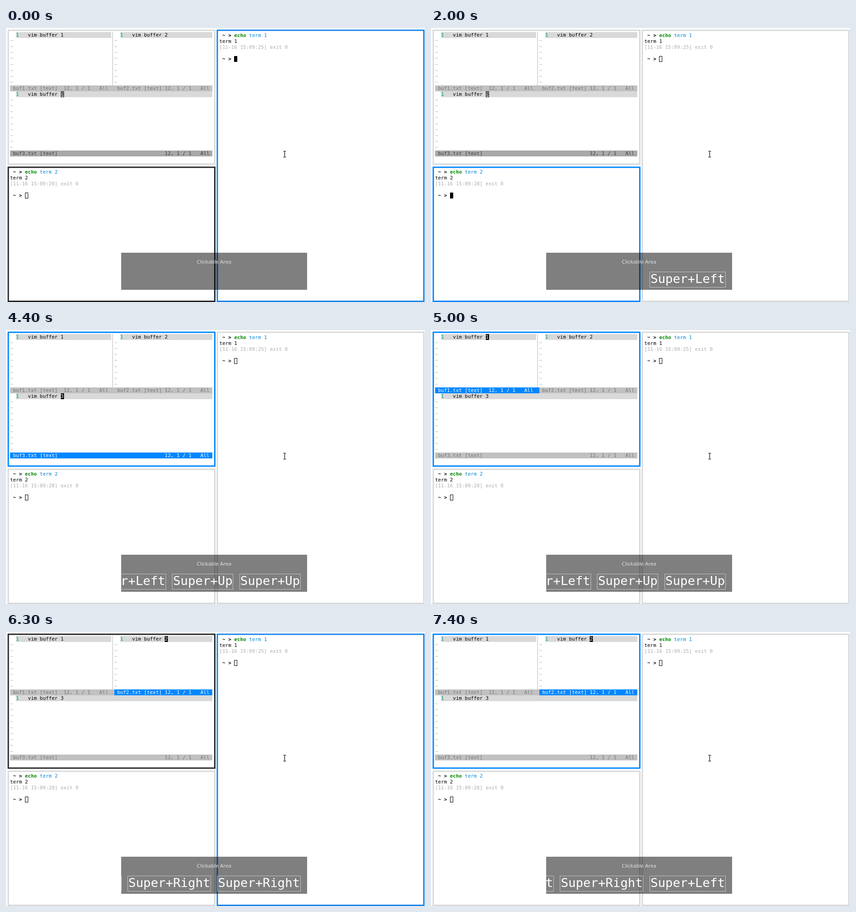
An HTML page with a canvas for the animation above (8 s loop, 924 by 606 pixels).

```html
<!DOCTYPE html>
<html lang="en">
<head>
<meta charset="utf-8">
<title>Window focus</title>
<style>
html, body { margin: 0; width: 100%; height: 100%; overflow: hidden; background: #fff; }
canvas { display: block; }
</style>
</head>
<body>
<canvas id="stage" width="924" height="606"></canvas>
<script>
const ctx = document.getElementById('stage').getContext('2d');
const LOOP = 8000;
const MONO = '"DejaVu Sans Mono", monospace';
const SIZE = 10.9, CELL = 6.56, ROW = 13.1;
const BLUE = '#0087ff', LIGHT = '#d9d9d9', DARK = '#262629', FAINT = '#adadad';

const FRAMES = {
  top: [5, 5, 455.5, 296],
  bottom: [5, 308, 455.5, 296.5],
  right: [466, 5, 455.5, 599.5]
};

// Each list holds [start time, value]; the latest started value applies.
const BORDERS = [[0, 'right'], [1500, 'bottom'], [3100, 'top'], [6300, 'right'], [7300, 'top']];
const CURSORS = [[0, 'right'], [1500, 'bottom'], [3100, 'top'], [6400, 'right'], [7400, 'top']];
const LAST_LEFT = [[0, 'bottom'], [3100, 'top']];
const BUFFERS = [[0, 3], [4500, 1], [5500, 2]];
const KEYS = [[1400, 'Left'], [3000, 'Up'], [4400, 'Up'], [5400, 'Right'], [6200, 'Right'], [7200, 'Left']];

function at(list, t) {
  return list.filter(item => item[0] <= t).pop()[1];
}

function rect(x, y, w, h, color) {
  ctx.fillStyle = color;
  ctx.fillRect(x, y, w, h);
}

function outline(x, y, w, h, color, width = 1) {
  ctx.strokeStyle = color;
  ctx.lineWidth = width;
  ctx.strokeRect(x, y, w, h);
}

function text(str, x, y, color, font) {
  ctx.font = font;
  ctx.fillStyle = color;
  ctx.fillText(str, x, y);
}

// A character grid with its top left corner at x, y.
function grid(x, y) {
  const px = col => x + col * CELL;
  const py = row => y + row * ROW;
  return {
    px, py,
    put(str, col, row, color = '#000', bold = false) {
      text(str, px(col), py(row) + 10.1, color, `${bold ? 'bold ' : ''}${SIZE}px ${MONO}`);
    },
    fill(col, row, cols, color) {
      const top = Math.round(py(row));
      rect(Math.round(px(col)), top, Math.round(cols * CELL), Math.round(py(row + 1)) - top, color);
    },
    cursor(col, row, solid, char = '') {
      const cx = Math.round(px(col)), cy = Math.round(py(row));
      if (solid) rect(cx, cy, 7, 13, '#000');
      else outline(cx + 0.5, cy + 0.5, 6, 12, '#000');
      if (char) this.put(char, col, row, solid ? '#fff' : '#000');
    }
  };
}

function drawFrames(t) {
  const focus = at(BORDERS, t);
  for (const name in FRAMES) {
    let color = LIGHT;
    if (name === focus) color = name === 'right' ? '#1a85e6' : BLUE;
    else if (focus === 'right' && name === at(LAST_LEFT, t)) color = DARK;
    outline(...FRAMES[name], color, 3);
  }
}

function drawTerm(x, y, n, seconds, solid) {
  const g = grid(x, y);
  g.put('~ >', 1, 0, '#000', true);
  g.put('echo', 5, 0, '#008700', true);
  g.put('term ' + n, 10, 0, '#0087d7');
  g.put('term ' + n, 0, 1);
  g.put(`[11-16 15:09:${seconds}] exit 0`, 0, 2, FAINT);
  g.put('~ >', 1, 4, '#000', true);
  g.cursor(5, 4, solid);
}

function drawBuffer(g, n, col, row, cols, rows, active, focused) {
  g.fill(col + 2, row, cols - 2, LIGHT);
  g.fill(col + 2, row, 1, '#d0dcda');
  g.put('1', col + 2, row, '#0b927b');
  g.put('vim buffer ' + n, col + 6, row);
  for (let i = 1; i < rows; i++) g.put('~', col, row + i, FAINT);
  if (active) g.cursor(col + 17, row, focused, String(n));

  const end = row + rows;
  const bar = !active ? '#c1c1c1' : focused ? BLUE : '#a8a8a8';
  const ink = !active ? '#767676' : focused ? '#fff' : '#404040';
  g.fill(col, end, n === 1 ? cols + 1 : cols, bar);
  g.put(`buf${n}.txt [text]`, col + 1, end, ink);
  g.put('12, 1 / 1', col + cols - 16, end, ink);
  g.put('All', col + cols - 4, end, ink);
}

function drawEditor(t, focused) {
  const g = grid(9, 8.9);
  const current = at(BUFFERS, t);
  const buffer = (n, ...place) => drawBuffer(g, n, ...place, n === current, focused);
  buffer(1, 0, 0, 34, 9);
  buffer(2, 35, 0, 33, 9);
  buffer(3, 0, 10, 68, 10);
  rect(234.5, 9, 1, 118, '#b2b2b2');
}

function drawPointer() {
  const beam = (color, width) => {
    ctx.strokeStyle = color;
    ctx.lineWidth = width;
    ctx.beginPath();
    ctx.moveTo(611.5, 272.5);
    ctx.lineTo(617.5, 272.5);
    ctx.moveTo(614.5, 272.5);
    ctx.lineTo(614.5, 285.5);
    ctx.moveTo(611.5, 285.5);
    ctx.lineTo(617.5, 285.5);
    ctx.stroke();
  };
  beam('#e4e4e4', 3);
  beam('#222', 1.2);
}

function drawKeys(t) {
  rect(254, 497, 410, 82, 'rgba(0,0,0,.5)');
  ctx.textAlign = 'center';
  text('Clickable Area', 459, 520.5, '#e2e2e2', '11.6px "Noto Sans", sans-serif');
  ctx.textAlign = 'left';

  ctx.save();
  ctx.beginPath();
  ctx.rect(254, 497, 410, 82);
  ctx.clip();
  let right = 650;
  for (const [, key] of KEYS.filter(k => k[0] <= t).reverse()) {
    const label = 'Super+' + key;
    const width = label.length * 16.4 + 4;
    const left = right - width;
    outline(Math.round(left) + 0.5, 539.5, Math.round(width) - 1, 34, '#c4c4c4');
    text(label, left + 2, 564, '#fff', `27.25px ${MONO}`);
    right = left - 13.2;
  }
  ctx.restore();
}

function draw(now) {
  const t = now % LOOP;
  const focus = at(CURSORS, t);
  rect(0, 0, 924, 606, '#fff');
  drawFrames(t);
  drawEditor(t, focus === 'top');
  drawTerm(9, 311.6, 2, 28, focus === 'bottom');
  drawTerm(470.5, 9.6, 1, 25, focus === 'right');
  drawPointer();
  drawKeys(t);
}

const start = performance.now();
function tick() {
  draw(performance.now() - start);
  requestAnimationFrame(tick);
}
tick();
</script>
</body>
</html>
```
